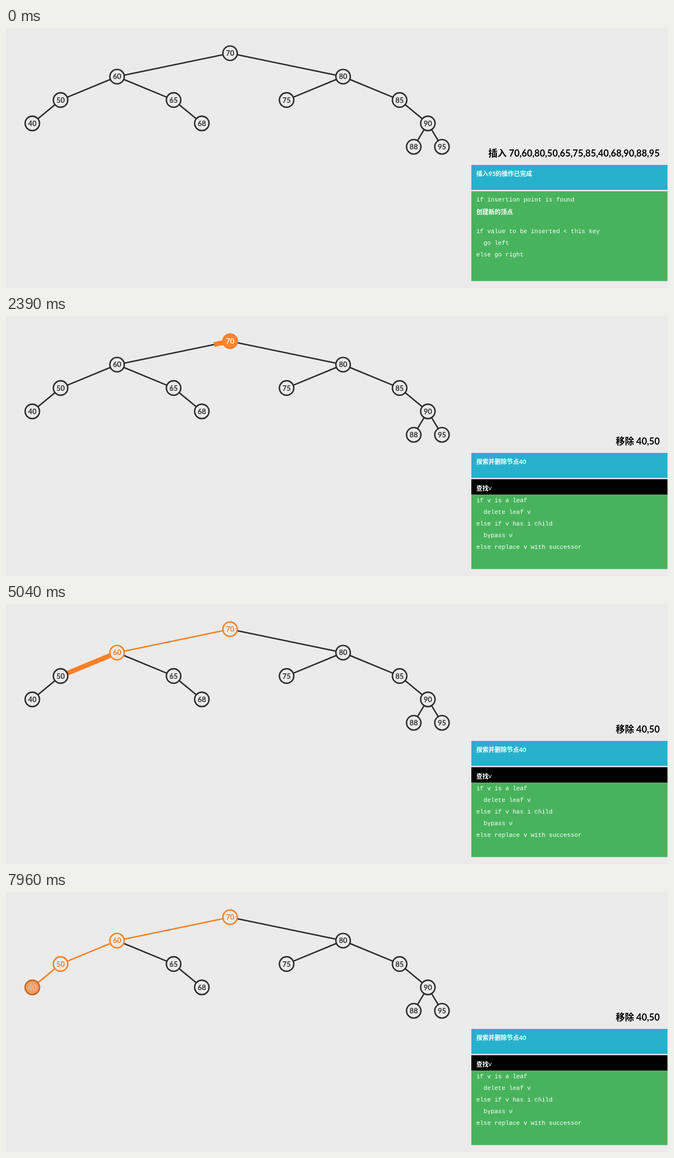
Write an HTML page with a canvas that moves like this. It is 1195x469 px and loops after 8 s.

```html
<!DOCTYPE html>
<html lang="zh-CN">
<head>
<meta charset="utf-8">
<style>
  html, body { margin: 0; width: 100%; height: 100%; overflow: hidden; background: #ebebeb; }
  canvas { display: block; }
</style>
</head>
<body>
<canvas id="stage" width="1195" height="469"></canvas>
<script>
const ctx = document.getElementById('stage').getContext('2d');
const LOOP = 8000, SWITCH = 40, START = 1065, STEP = 1047;
const BG = [235, 235, 235], DARK = [45, 45, 45], ORANGE = [252, 127, 38], WHITE = [255, 255, 255];
const SANS = 'Lato, "Noto Sans CJK SC", "Noto Sans CJK", sans-serif';
const MONO = '10.93px "Liberation Mono", monospace';

// key: [x, depth, parent]
const tree = {
  70: [404.5, 0], 60: [200.5, 1, 70], 80: [608.5, 1, 70],
  50: [98.5, 2, 60], 65: [302.5, 2, 60], 75: [506.5, 2, 80], 85: [710.5, 2, 80],
  40: [47.5, 3, 50], 68: [353.5, 3, 65], 90: [761.5, 3, 85],
  88: [736, 4, 90], 95: [787, 4, 90]
};
const path = [70, 60, 50, 40];
const pos = key => ({ x: tree[key][0], y: 45.5 + 42.2 * tree[key][1] });

const rgb = c => `rgb(${c.map(Math.round)})`;
const mix = (a, b, p) => a.map((v, i) => v + (b[i] - v) * p);

function ease(t) {
  t = Math.max(0, Math.min(1, t));
  return t < 0.5 ? 4 * t ** 3 : 1 - 4 * (1 - t) ** 3;
}

function rect(y, h, color) {
  ctx.fillStyle = color;
  ctx.fillRect(840, y, 354, h);
}

function text(str, x, y, font, color, align = 'left') {
  ctx.font = font;
  ctx.fillStyle = color;
  ctx.textAlign = align;
  ctx.fillText(str, x, y);
}

function line(a, b, width, color) {
  ctx.lineWidth = width;
  ctx.strokeStyle = rgb(color);
  ctx.beginPath();
  ctx.moveTo(a.x, a.y);
  ctx.lineTo(b.x, b.y);
  ctx.stroke();
}

function drawEdge(key, s) {
  const a = pos(tree[key][2]), b = pos(key);
  const i = path.indexOf(+key);
  const t = i < 0 ? 0 : s - (2 * i - 1);
  line(a, b, 2.6, t >= 1 ? ORANGE : DARK);
  if (t <= 0 || t >= 1) return;
  // a thick stroke runs from the parent's rim to just inside the child
  const len = Math.hypot(b.x - a.x, b.y - a.y);
  const k = (16 + ease(t) * (len - 26)) / len;
  line(a, { x: a.x + (b.x - a.x) * k, y: a.y + (b.y - a.y) * k }, 8.5, ORANGE);
}

function drawNode(key, s) {
  const { x, y } = pos(key), i = path.indexOf(+key);
  const on = i < 0 ? 0 : ease(s - 2 * i);
  const off = i < 0 ? 0 : ease(s - 2 * i - 1);
  ctx.beginPath();
  ctx.arc(x, y, 13, 0, 7);
  ctx.fillStyle = rgb(mix(BG, ORANGE, on - off));
  ctx.fill();
  ctx.lineWidth = 2.6;
  ctx.strokeStyle = rgb(mix(DARK, ORANGE, on));
  ctx.stroke();
  text(key, x, y + 4.7, 'bold 13px ' + SANS, rgb(mix(mix(DARK, WHITE, on), ORANGE, off)), 'center');
}

function drawPanels(time, s) {
  const removing = time >= SWITCH;
  const label = 'bold 11px ' + SANS;
  const code = (str, y) => text(str, 849, y, MONO, '#fff');
  text(removing ? '移除 40,50' : '插入 70,60,80,50,65,75,85,40,68,90,88,95',
    1180, 231.5, 'bold 16.5px ' + SANS, '#000', 'right');
  rect(247, 45, '#27b1cd');
  rect(294.5, 162, '#48b35d');
  text(removing ? '搜索并删除节点40' : '插入95的操作已完成', 849, 267, label, '#fff');
  if (removing) {
    if (s >= 0) rect(294.5, 27.5, '#000');
    text('查找', 849, 315, label, '#fff');
    text('v', 870.5, 314, MONO, '#fff');
    ['if v is a leaf', '  delete leaf v', 'else if v has 1 child', '  bypass v',
      'else replace v with successor'].forEach((str, i) => code(str, 336 + 21.1 * i));
  } else {
    code('if insertion point is found', 312.5);
    text('创建新的顶点', 849, 336, label, '#fff');
    ['if value to be inserted < this key', '  go left', 'else go right']
      .forEach((str, i) => code(str, 370 + 21.1 * i));
  }
}

function frame(now) {
  const time = now % LOOP, s = (time - START) / STEP;
  ctx.fillStyle = rgb(BG);
  ctx.fillRect(0, 0, 1195, 469);
  const keys = Object.keys(tree);
  keys.filter(key => tree[key][2]).forEach(key => drawEdge(key, s));
  keys.forEach(key => drawNode(key, s));
  drawPanels(time, s);
  requestAnimationFrame(frame);
}
requestAnimationFrame(frame);
</script>
</body>
</html>
```
